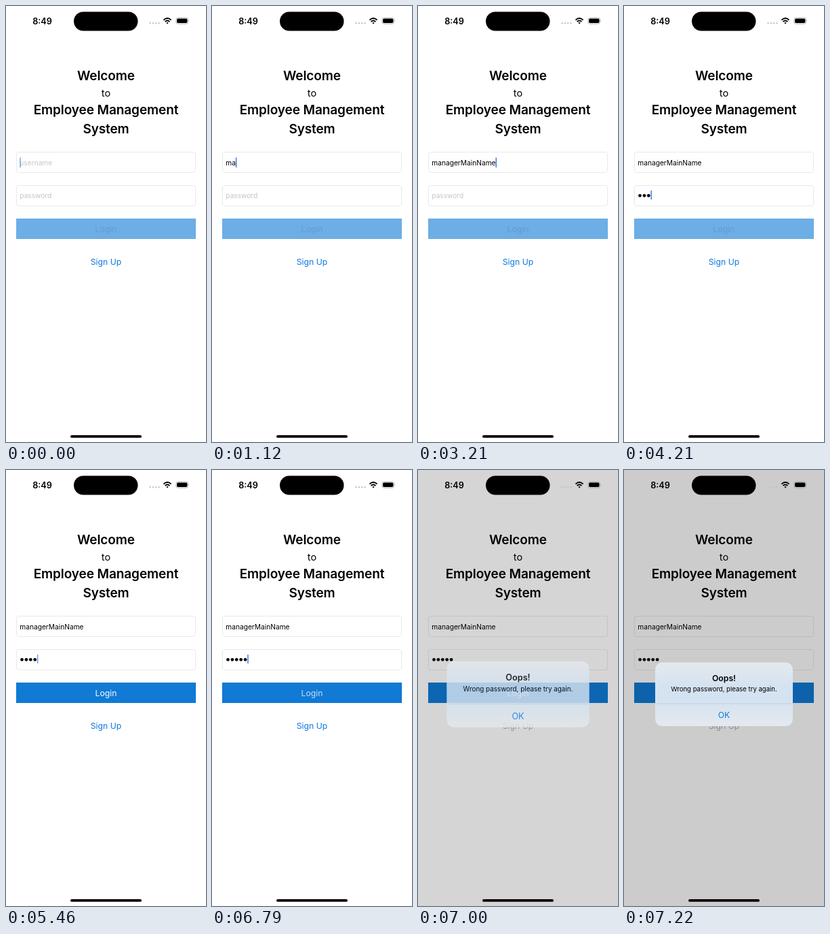
Write an HTML page that moves like this. It is 295 px wide and 640 px high and loops after 8000 ms.

```html
<!DOCTYPE html>
<html lang="en">
<head>
<meta charset="utf-8">
<title>Login</title>
<style>
  html, body { margin: 0; width: 100%; height: 100%; overflow: hidden; background: #fff; }
  svg { display: block; width: 295px; height: 640px; font-family: Inter, sans-serif; font-size: 12.2px; }
  .mid { text-anchor: middle; }
  .bold { font-weight: 600; }
  .head { font-size: 19px; letter-spacing: -.1px; }
  .input { font-size: 10.2px; }
  .hint { fill: #c5c5c8; }
  .field { fill: #fff; stroke: #e9e9e9; }
</style>
</head>
<body>
<svg viewBox="0 0 295 640">
  <rect width="295" height="640" fill="#fff"/>
  <g class="mid bold head">
    <text x="147.5" y="109">Welcome</text>
    <text x="147.5" y="158.5">Employee Management</text>
    <text x="147.5" y="186.5">System</text>
  </g>
  <text class="mid" x="147.5" y="132.5" font-size="14.5">to</text>

  <rect class="field" x="15.5" y="214.5" width="264" height="30" rx="3.5"/>
  <rect class="field" x="15.5" y="263.5" width="264" height="30" rx="3.5"/>
  <text class="input" id="user" x="20.3" y="233.8"></text>
  <text class="input hint" id="passHint" x="20.3" y="282">password</text>
  <g id="dots"></g>
  <rect id="caret" width="1.4" fill="#2f72e2"/>

  <rect id="button" x="15" y="312" width="265" height="30"/>
  <text class="mid" id="login" x="147.5" y="331.5">Login</text>
  <text class="mid" id="signUp" x="147.5" y="379.7">Sign Up</text>

  <rect id="dim" width="295" height="640"/>

  <text class="mid bold" x="53.5" y="26.5" font-size="12.7">8:49</text>
  <rect x="100" y="8.5" width="94.5" height="28" rx="14"/>
  <path d="M212.6 25.3h14" stroke="#c2c2c4" stroke-width="2.4" stroke-linecap="round" stroke-dasharray="0 4.3"/>
  <g fill="none" stroke="#000" stroke-width="1.9">
    <path d="M232.4 20.6q5.6-5 11.2 0M234.6 23q3.4-3 6.8 0"/>
    <path d="M238 26.4l-1.6-1.7q1.6-1.3 3.2 0z" fill="#000" stroke="none"/>
  </g>
  <rect x="250.8" y="17.3" width="17.8" height="9" rx="2.9" fill="none" stroke="#a3a3a5" stroke-width=".8"/>
  <rect x="252" y="18.5" width="15.4" height="6.6" rx="1.8"/>
  <path d="M269.6 20.3q1.4 1.5 0 3z" fill="#a3a3a5"/>
  <rect x="95" y="630" width="105" height="3.8" rx="1.9"/>

  <defs>
    <linearGradient id="glass" x2="0" y2="1">
      <stop offset="0" stop-color="#e5e9ed"/>
      <stop offset=".35" stop-color="#d5e3f1"/>
      <stop offset=".6" stop-color="#d4e3f1"/>
      <stop offset="1" stop-color="#e4e9ee"/>
    </linearGradient>
  </defs>
  <g id="alert" class="mid">
    <rect x="46" y="282.5" width="203" height="93.5" rx="10.5" fill="url(#glass)"/>
    <path d="M46 343h203" stroke="#b9c5d0" stroke-width=".7"/>
    <text class="bold" x="147.5" y="309.5">Oops!</text>
    <text x="147.5" y="324.8" font-size="9.55">Wrong password, please try again.</text>
    <text x="147.5" y="364.3" fill="#0b7ae4">OK</text>
  </g>
</svg>
<script>
const LOOP = 8000;
const NAME = 'managerMainName';
const TEXT_X = 20.3, DOT_STEP = 6.4;

// Each track is a list of [start time, value]; values hold until the next start.
const typed = [[0, 0], [990, 1], [1120, 2], [1260, 3], [1410, 4], [1540, 5], [1740, 7],
  [2030, 8], [2310, 9], [2500, 10], [2630, 12], [2840, 14], [3210, 15]];
const masked = [[0, 0], [3670, 1], [4210, 3], [4720, 4], [6280, 5]];
const caretAlpha = [[0, .7], [110, 0], [390, .5], [510, 1], [4980, .5], [5100, 0],
  [5340, .4], [5460, .75], [6000, .4], [6110, 0], [6280, 1], [6890, 0]];
const shown = [[0, 0], [6890, .5], [7000, .82], [7110, .96], [7220, 1]];
const FOCUS_PASSWORD = 3470, ENABLED = 4720, PRESSED = 6650, RELEASED = 7000;

const at = (track, t) => track.findLast(([start]) => t >= start)[1];
const $ = id => document.getElementById(id);
const set = (id, attrs) => {
  for (const key in attrs) $(id).setAttribute(key, attrs[key]);
};

$('dots').innerHTML = Array.from({ length: 5 }, (_, i) =>
  `<circle cx="${23.5 + i * DOT_STEP}" cy="278.3" r="2.35"/>`).join('');

function draw(t) {
  const letters = at(typed, t), count = at(masked, t), p = at(shown, t);
  const inPassword = t >= FOCUS_PASSWORD, enabled = t >= ENABLED;
  const pressed = t >= PRESSED && t < RELEASED;

  $('user').textContent = letters ? NAME.slice(0, letters) : 'username';
  set('user', { fill: letters ? '#000' : '#c5c5c8' });
  set('passHint', { opacity: count ? 0 : 1 });
  [...$('dots').children].forEach((dot, i) => dot.setAttribute('opacity', i < count ? 1 : 0));

  const width = inPassword ? count * DOT_STEP : letters && $('user').getComputedTextLength();
  set('caret', {
    x: TEXT_X + width,
    y: inPassword ? 271 : 222.5,
    height: inPassword ? 13 : 14.5,
    opacity: at(caretAlpha, t)
  });

  set('button', { fill: enabled ? '#107ad5' : '#6caee5' });
  set('login', { fill: !enabled ? '#649bce' : pressed ? '#c4dff5' : '#fff' });
  set('signUp', { fill: p > .5 ? '#b0b0b4' : '#0b79e0' });
  set('dim', { opacity: .2 * p });
  set('alert', {
    opacity: p,
    transform: `translate(147.5 329.3) scale(${1.2 - .2 * p}) translate(-147.5 -329.3)`
  });
}

const start = performance.now();
function tick() {
  draw((performance.now() - start) % LOOP);
  requestAnimationFrame(tick);
}
tick();
</script>
</body>
</html>
```
